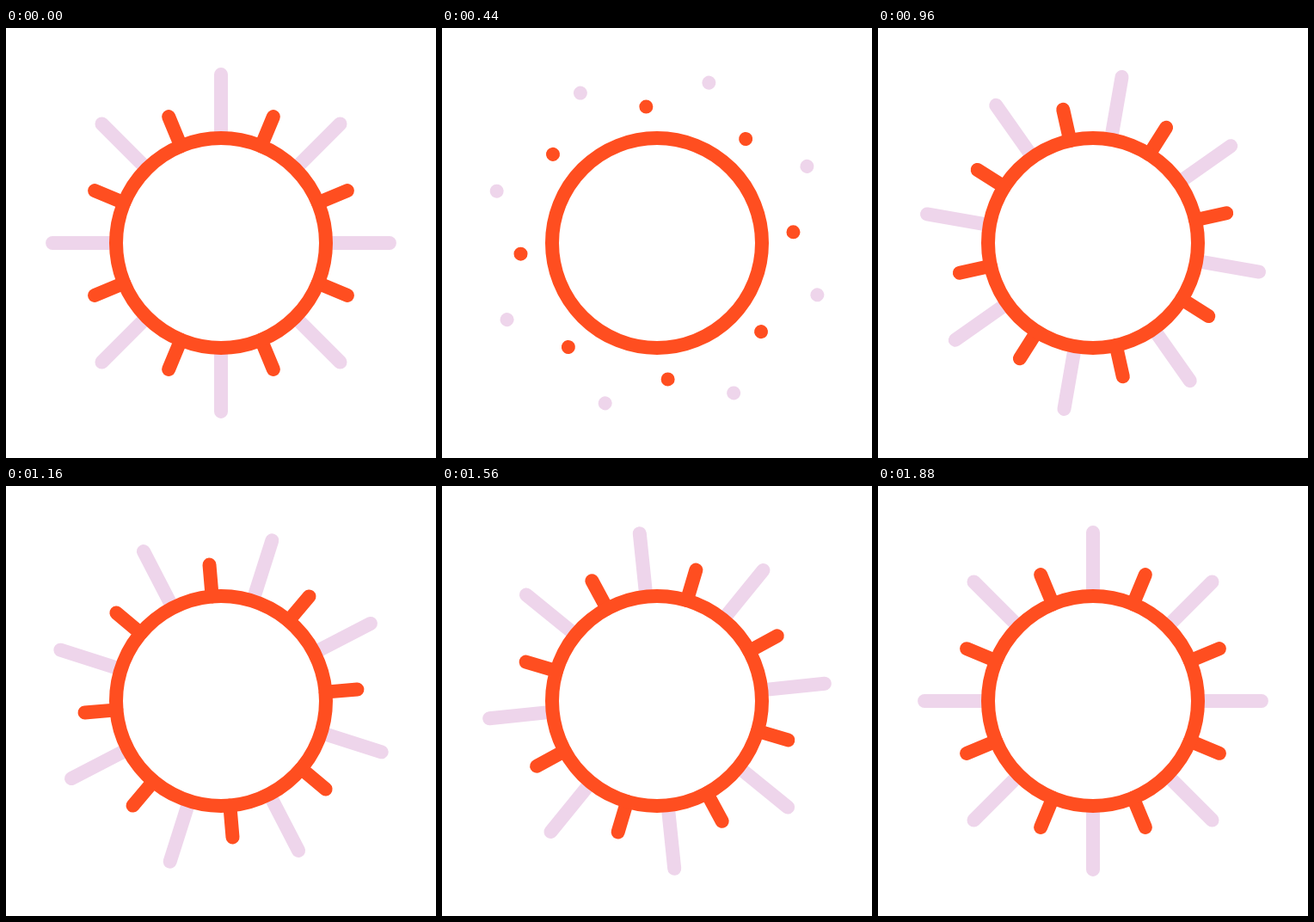
An HTML page that plays this animation: 500 by 500 pixels, repeating every 2 s.

```html
<!DOCTYPE html>
<html lang="en">
<head>
<meta charset="utf-8">
<title>Sun</title>
<style>
  html, body { margin: 0; width: 100%; height: 100%; overflow: hidden; background: #fff; }
  svg { display: block; width: 100%; height: 100%; }
  circle, path { fill: none; stroke-width: 16; stroke-linecap: round; }
  .warm { stroke: #ff4e20; }
  .pale { stroke: #eed5eb; }
</style>
</head>
<body>
<svg viewBox="0 0 500 500">
  <g transform="translate(250 250)">
    <g id="rays">
      <path id="long" class="pale"/>
      <path id="short" class="warm"/>
    </g>
    <circle class="warm" r="122"/>
  </g>
</svg>
<script>
  const LOOP = 2000, STEP = 40;
  const BASE = 122, LONG = 73.9, SHORT = 37;
  const SWING = -38.5, TURN = 716, REST = 1884;
  const GONE = 446, GROWN = 764;

  const rays = document.getElementById('rays');
  const longRays = document.getElementById('long');
  const shortRays = document.getElementById('short');

  // Quadratic ease in and out of t between two times, clamped to 0..1
  function ease(t, from, to) {
    const s = Math.min(1, Math.max(0, (t - from) / (to - from)));
    return s < 0.5 ? 2 * s * s : 1 - 2 * (1 - s) ** 2;
  }

  // Eight spokes covering the part a..b of the given length
  function spokes(length, offset, a, b) {
    let d = '';
    for (let i = 0; i < 8; i++) {
      const angle = (offset + i * 45) * Math.PI / 180;
      const point = part => {
        const r = BASE + part * length;
        return (r * Math.sin(angle)).toFixed(2) + ' ' + (-r * Math.cos(angle)).toFixed(2);
      };
      d += 'M' + point(a) + 'L' + point(b);
    }
    return d;
  }

  function draw(t) {
    const turn = SWING * (ease(t, 0, TURN) - ease(t, TURN, REST));
    // Rays fly off outwards, then grow again from the ring
    const leaving = t < GONE;
    const a = leaving ? ease(t, 0, GONE) : 0;
    const b = leaving ? 1 : ease(t, GONE, GROWN);
    rays.setAttribute('transform', 'rotate(' + turn.toFixed(3) + ')');
    longRays.setAttribute('d', spokes(LONG, 0, a, b));
    shortRays.setAttribute('d', spokes(SHORT, 22.5, a, b));
  }

  // Each pose is held for one step
  const start = performance.now();
  function tick() {
    const t = (performance.now() - start) % LOOP;
    draw(Math.floor(t / STEP) * STEP);
    requestAnimationFrame(tick);
  }
  tick();
</script>
</body>
</html>
```
